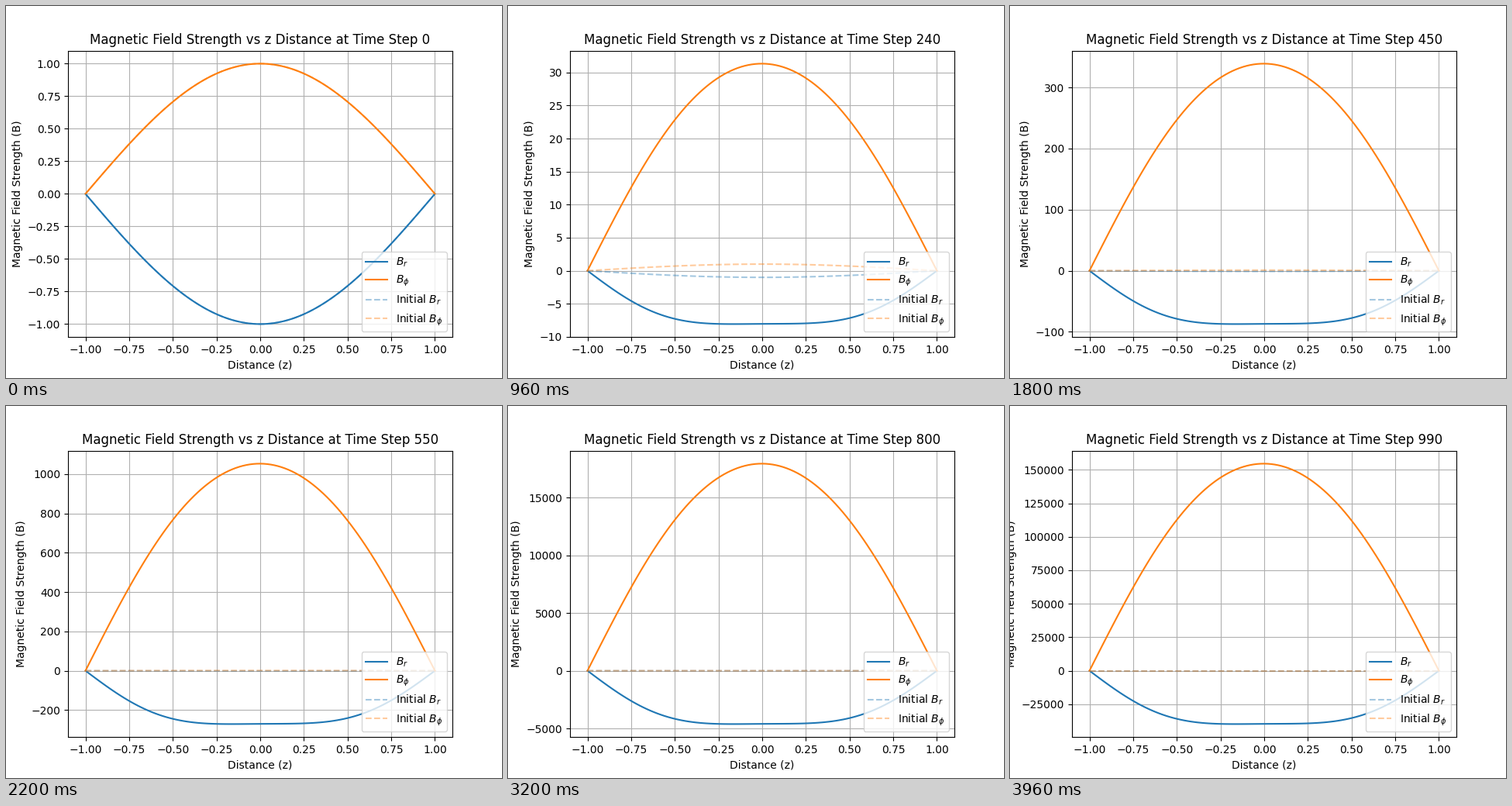
Recreate the animation shown at these times as a matplotlib script. Size 640 px wide and 480 px high, loop 4000 ms.

```python
import numpy as np
import matplotlib.pyplot as plt
from matplotlib.animation import FuncAnimation

FRAMES = 100
STRIDE = 10            # time steps per frame
RATE = 0.011339        # growth rate per step
RATIO = 0.2575         # peak |B_r| / peak B_phi of the growing mode
FINAL_PEAK = 154620    # B_phi peak at the last step
DIFFUSION = 0.1        # eta * dt

z = np.linspace(-1, 1, 101)
h = z[1] - z[0]
eye = np.eye(len(z) - 2)
below = np.eye(len(z) - 2, k=-1)

# Implicit diffusion and the alpha effect on the interior points
laplace = (below + below.T - 2 * eye) / h**2
diffuse = np.linalg.inv(eye - DIFFUSION * laplace)
twist = diffuse @ (np.sin(np.pi * z[1:-1])[:, None] * (eye - below) / h)


def couplings():
    """Alpha and shear that give the wanted growth rate and field ratio."""
    growth = np.exp(RATE)
    resolvent = np.linalg.inv(growth * eye - diffuse)
    loop = -growth * resolvent @ diffuse @ resolvent @ twist
    values, vectors = np.linalg.eig(loop)
    top = np.argmax(values.real)
    mode = vectors[:, top].real
    response = resolvent @ twist @ mode
    alpha = RATIO * np.abs(mode).max() / np.abs(response).max()
    return alpha, 1 / (values[top].real * alpha)


def evolve():
    """Both fields at every displayed step."""
    alpha, shear = couplings()
    b_phi = np.cos(np.pi * z[1:-1] / 2)
    b_r = -b_phi
    history = [(b_r, b_phi)]
    for step in range(1, (FRAMES - 1) * STRIDE + 1):
        b_r = diffuse @ b_r + alpha * twist @ b_phi
        b_phi = diffuse @ (b_phi - shear * b_r)
        if step % STRIDE == 0:
            history.append((b_r, b_phi))
    fields = np.pad(np.array(history), ((0, 0), (0, 0), (1, 1)))
    fields[1:] *= FINAL_PEAK / fields[-1, 1].max()
    return fields


fields = evolve()
fig, ax = plt.subplots(figsize=(6.4, 4.8), dpi=100)


def draw(i):
    ax.clear()
    names = ("$B_r$", r"$B_\phi$")
    for k, name in enumerate(names):
        ax.plot(z, fields[i, k], color=f"C{k}", label=name)
    for k, name in enumerate(names):
        ax.plot(z, fields[0, k], "--", color=f"C{k}", alpha=0.4,
                label="Initial " + name)
    ax.set_xlabel("Distance (z)")
    ax.set_ylabel("Magnetic Field Strength (B)")
    ax.set_title(f"Magnetic Field Strength vs z Distance at Time Step {i * STRIDE}")
    ax.legend(loc="lower right")
    ax.grid(True)


anim = FuncAnimation(fig, draw, frames=FRAMES, interval=40,
                     init_func=lambda: None, repeat=True)
plt.show()
```
